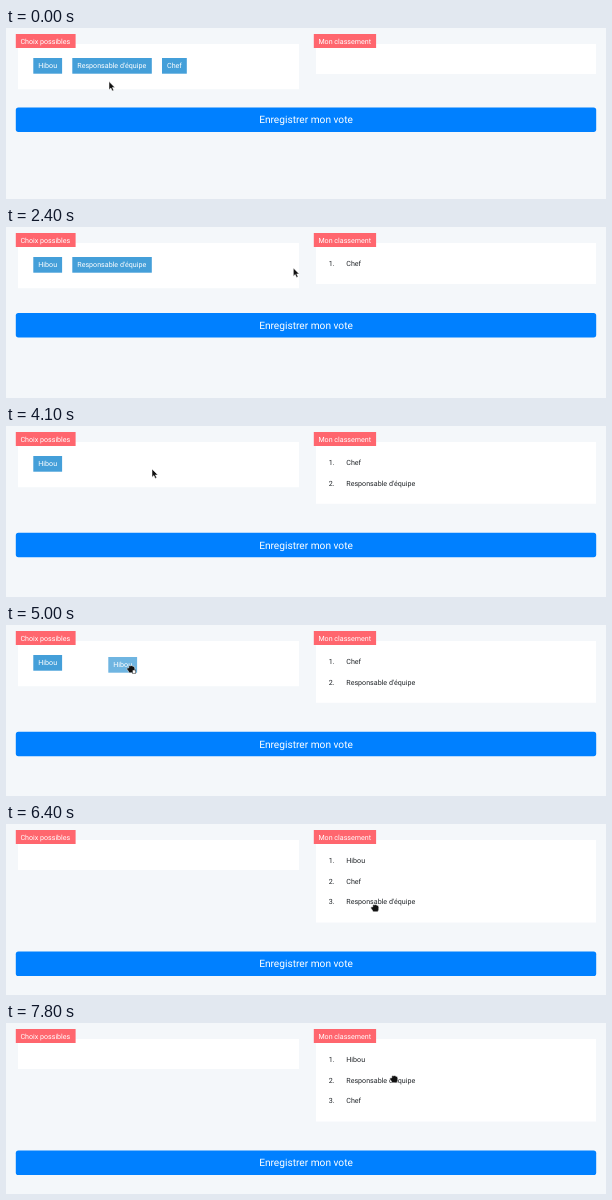
An HTML page that plays this animation: 600x171 px, repeating every 8 s.

```html
<!DOCTYPE html>
<html lang="fr">
<head>
<meta charset="utf-8">
<title>Classement</title>
<style>
  html, body { margin: 0; width: 100%; height: 100%; overflow: hidden; background: #f4f7fa; }
  svg { display: block; width: 600px; height: 171px; }
  text { font: 7.11px Roboto, sans-serif; fill: #212529; text-rendering: geometricPrecision; }
  .light { fill: #fff; }
  .cta { font-size: 10.16px; text-anchor: middle; }
  .panel { fill: #fff; }
  .label { fill: #ff666e; }
  .chip { fill: #449fd9; }
  .button { fill: #0080ff; }
  .target { fill: #faf0e6; }
</style>
</head>
<body>
<svg id="stage" viewBox="0 0 600 171"></svg>
<script>
const LOOP = 8000, STEP = 100;
const ROW_TOP = 26.1, ROW_H = 20.8;
const HIBOU = "Hibou", TEAM = "Responsable d'équipe", CHEF = "Chef";

const chips = [
  { name: HIBOU, x: 27.3, w: 28.8 },
  { name: TEAM, x: 66.3, w: 79.5 },
  { name: CHEF, x: 156, w: 24.8 }
];

// time, chips left, ranking, highlighted row
const states = [
  [0, 3, [], -1],
  [1900, 2, [CHEF], 0],
  [2200, 2, [CHEF], -1],
  [3500, 1, [CHEF, TEAM], 1],
  [3700, 1, [CHEF, TEAM], -1],
  [5200, 0, [HIBOU, CHEF, TEAM], 0],
  [5900, 0, [HIBOU, CHEF, TEAM], -1],
  [6600, 0, [HIBOU, CHEF, TEAM], 2],
  [7100, 0, [HIBOU, TEAM, CHEF], 1],
  [7700, 0, [HIBOU, TEAM, CHEF], -1]
];

// time, x, y, shape
const pointer = [
  [0, 103, 53.5, "arrow"], [200, 109, 46, "hand"], [300, 116, 42, "hand"],
  [400, 116, 42, "hand"], [700, 139, 43, "hand"], [800, 149, 43, "arrow"],
  [900, 158, 43, "hand"], [1100, 165, 44, "hand"], [1300, 165, 44, "hand"],
  [1400, 182, 45, "drag"], [1600, 252, 48, "drag"], [1800, 321, 48, "drag"],
  [2000, 341, 45, "drag"], [2100, 341, 45, "drag"],
  [2200, 338, 41, "arrow"], [2500, 262, 41, "arrow"], [2800, 135, 43, "hand"],
  [3000, 109, 44, "hand"], [3100, 109, 44, "hand"],
  [3200, 182, 47, "drag"], [3400, 331, 56, "drag"], [3600, 350, 60, "drag"],
  [3700, 348, 57, "arrow"], [3800, 325, 52, "arrow"], [4000, 218, 44, "arrow"],
  [4100, 146, 43, "arrow"], [4400, 64, 43, "arrow"], [4600, 44, 43, "hand"],
  [4900, 45, 44, "drag"], [5000, 125, 44, "drag"], [5300, 368, 46, "drag"],
  [5700, 372, 40, "drag"], [5800, 372, 40, "drag"],
  [5900, 372, 41, "hand"], [6200, 371, 70, "hand"], [6400, 369, 84, "hand"],
  [6500, 369, 84, "hand"], [6600, 370, 82, "hand"], [7100, 383, 61, "hand"],
  [7400, 388, 56, "hand"], [8000, 388, 56, "hand"]
];

// path entries: time, dx, dy
const drags = [
  { item: 2, from: 1400, to: 2200, alpha: .77,
    path: [[1400, 6, 1], [1600, 68, 5], [1800, 138.5, 7.4], [2000, 166, 4]] },
  { item: 1, from: 3200, to: 3700, alpha: .6,
    path: [[3200, 55, 4], [3400, 203.7, 13.5], [3600, 228, 18]] },
  { item: 0, from: 4900, to: 5900, alpha: .77,
    path: [[4900, 7, 1], [5000, 75, 2], [5300, 304, 5.3], [5700, 310, 1]] },
  { row: 2, from: 6600, to: 7700, alpha: .5,
    path: [[6600, 1, -2], [7100, 12, -21], [7400, 17, -26]] }
];

const lastBefore = (table, t) => table.findLast(entry => entry[0] <= t) || table[0];

function place(table, t) {
  const a = lastBefore(table, t);
  const b = table[table.indexOf(a) + 1] || a;
  const k = a === b ? 0 : Math.max(0, (t - a[0]) / (b[0] - a[0]));
  return [a[1] + (b[1] - a[1]) * k, a[2] + (b[2] - a[2]) * k, a[3]];
}

const rect = (cls, x, y, w, h, r = 0) =>
  `<rect class="${cls}" x="${x}" y="${y}" width="${w}" height="${h}" rx="${r}"/>`;
const text = (str, x, y, cls = "") => `<text class="${cls}" x="${x}" y="${y}">${str}</text>`;
const group = (body, x, y, alpha = 1) =>
  `<g transform="translate(${x} ${y})" opacity="${alpha}">${body}</g>`;

const label = (str, x, w) => rect("label", x, 6, w, 14) + text(str, x + 4.6, 15.5, "light");
const chip = c => rect("chip", c.x, 30, c.w, 15.7) + text(c.name, c.x + 5, 40.2, "light");
const rowBase = i => ROW_TOP + i * ROW_H + 12.6;

function row(name, i, active) {
  const line = text(`${i + 1}.`, 322.8, rowBase(i)) + text(name, 340.3, rowBase(i));
  if (i !== active) return line;
  return rect("target", 331, ROW_TOP + i * ROW_H, 239, ROW_H) + group(line, 0, 0, .4);
}

const arrowShape = `<path d="M0 0V8.2L1.9 6.5L3.2 9.4L4.7 8.7L3.4 5.9H5.9Z"
  fill="#111" stroke="#fff" stroke-width=".5"/>`;
const handShape = `<path d="M-4.3 0Q-4 -1.5 -2.2 -1.1V-2.7Q-1.2 -4 -.2 -3.1Q1 -4.2 1.8 -2.8
  Q3.8 -3 3.8 -.8Q4.1 1.6 2.8 3.8H-1.9Q-2.5 2 -4.3 0Z" fill="#111" stroke="#fff" stroke-width=".5"/>`;
const badge = `<rect x="1.4" y="1" width="3.4" height="3.2" fill="#fff" stroke="#111" stroke-width=".5"/>`;
const shapes = { arrow: arrowShape, hand: handShape, drag: handShape + badge };

function ghost(t) {
  const drag = drags.find(d => t >= d.from && t < d.to);
  if (!drag) return "";
  const [dx, dy] = place(drag.path, t);
  const body = drag.row ? text(TEAM, 340.3, rowBase(drag.row)) : chip(chips[drag.item]);
  return group(body, dx, dy, drag.alpha);
}

function scene(t) {
  const [, left, ranking, active] = lastBefore(states, t);
  const count = ranking.length;
  const rightH = count ? 20.2 + count * ROW_H : 30;
  const buttonY = count ? 65.2 + count * ROW_H : 79.5;
  const [x, y, shape] = place(pointer, t);
  return rect("panel", 12, 16, 281, left ? 45.2 : 30)
    + rect("panel", 310, 16, 280, rightH)
    + label("Choix possibles", 9.8, 59.8)
    + label("Mon classement", 307.8, 62.3)
    + chips.slice(0, left).map(chip).join("")
    + ranking.map((name, i) => row(name, i, active)).join("")
    + rect("button", 9.8, buttonY, 580.4, 24.4, 2.6)
    + text("Enregistrer mon vote", 300, buttonY + 15.7, "light cta")
    + ghost(t)
    + group(shapes[shape], x, y);
}

const stage = document.getElementById("stage");
const start = performance.now();
let shown = -1;

function tick() {
  const t = Math.floor(((performance.now() - start) % LOOP) / STEP) * STEP;
  if (t !== shown) stage.innerHTML = scene(shown = t);
  requestAnimationFrame(tick);
}
tick();
</script>
</body>
</html>
```
